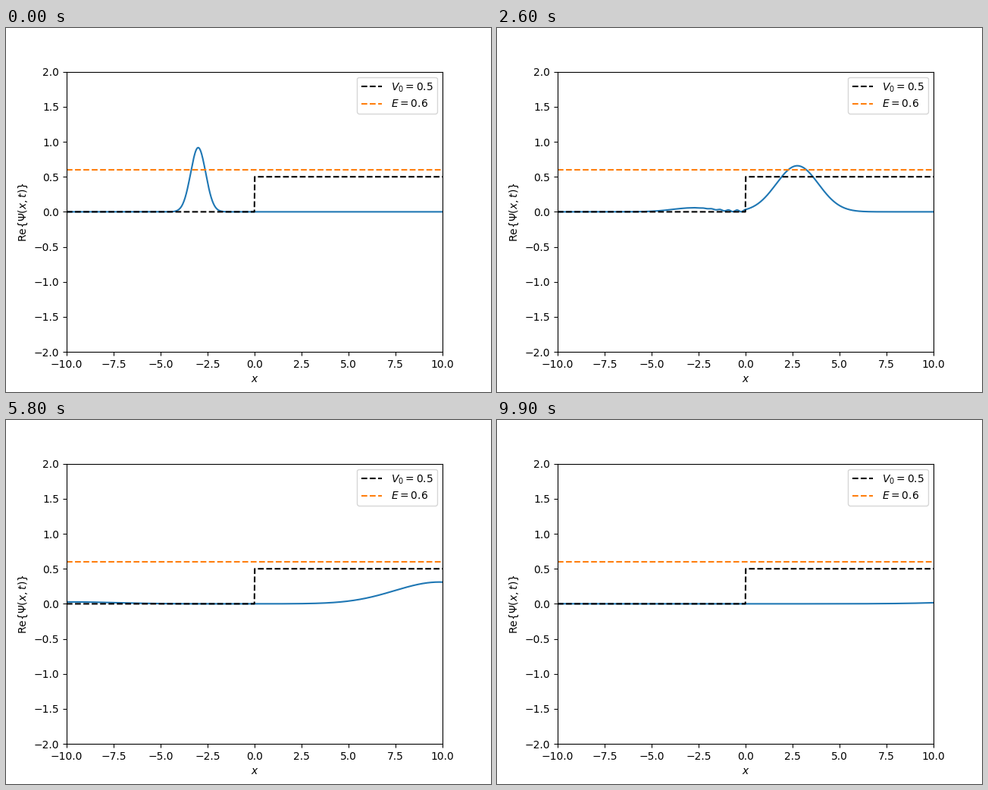
Write a matplotlib script that moves like this. It is 640 px wide and 480 px high and loops after 10 s.

```python
import numpy as np
import matplotlib.pyplot as plt
from matplotlib.animation import FuncAnimation

FRAMES, INTERVAL = 100, 100
E, V0 = 0.6, 0.5
X0, SIGMA, TAU, PEAK = -3.0, 0.4, 2.0, 0.916
HBAR = 1 / (2 * np.pi)

speed = np.sqrt(2 * E)
k = speed / HBAR
k1, k2 = np.sqrt(E), np.sqrt(E - V0)
refl = (k1 - k2) / (k1 + k2)
trans = 2 * k1 / (k1 + k2)

x = np.linspace(-10, 10, 1000)
times = np.linspace(0, 20, FRAMES)


def packet(x, t):
    """Spreading Gaussian packet moving to the right."""
    spread = np.sqrt(1 + (t / TAU) ** 2)
    d = x - X0 - speed * t
    envelope = np.sqrt(PEAK / spread) * np.exp(-(d / (2 * SIGMA * spread)) ** 2)
    return envelope * np.exp(1j * k * x)


def density(t):
    incoming = packet(x, t)
    left = incoming + refl * packet(-x, t)
    return np.abs(np.where(x < 0, left, trans * incoming)) ** 2


fig, ax = plt.subplots(figsize=(6.4, 4.8), dpi=100)
wave, = ax.plot(x, density(0), color="C0")
ax.plot(x, np.where(x < 0, 0, V0), "k--", label="$V_0=0.5$")
ax.plot(x, np.full_like(x, E), "--", color="C1", label="$E=0.6$")
ax.set(xlim=(-10, 10), ylim=(-2, 2), xlabel="$x$",
       ylabel=r"Re$\{\Psi(x,t)\}$")
ax.legend(loc="upper right")


def update(i):
    wave.set_ydata(density(times[i]))
    return wave,


anim = FuncAnimation(fig, update, frames=FRAMES, interval=INTERVAL,
                     repeat=True, repeat_delay=0)
plt.show()
```
